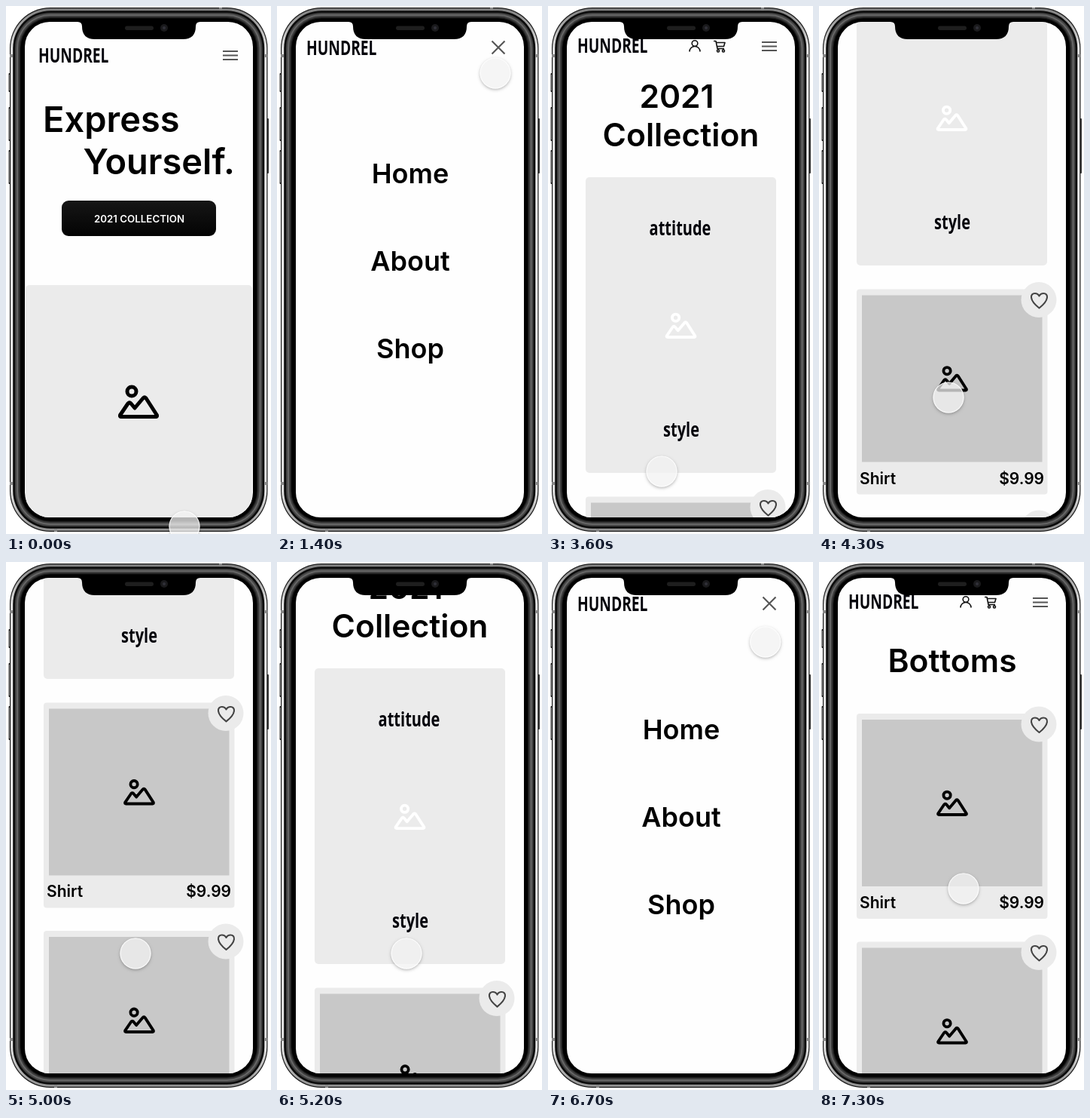
Animation, 352 px wide and 700 px high, one loop 8 s. Source, as an HTML page with a canvas:

```html
<!DOCTYPE html>
<html lang="en">
<head>
<meta charset="utf-8">
<title>Shop prototype</title>
<style>
html, body { margin: 0; width: 100%; height: 100%; overflow: hidden; background: #fff; }
canvas { display: block; }
</style>
</head>
<body>
<canvas id="stage" width="352" height="700"></canvas>
<script>
const ctx = document.getElementById('stage').getContext('2d');
const LOOP = 8000, STEP = 100;
const BRAND = 'HUNDREL';
const LIGHT = '#ebebeb', MID = '#c8c8c8';

// ---------- helpers ----------
function rr(x, y, w, h, r, fill) {
  ctx.beginPath();
  ctx.roundRect(x, y, w, h, r);
  ctx.fillStyle = fill;
  ctx.fill();
}
function disc(x, y, r, fill) {
  ctx.beginPath();
  ctx.arc(x, y, r, 0, 7);
  ctx.fillStyle = fill;
  ctx.fill();
}
function label(s, x, y, size, { align = 'center', weight = 600, fill = '#000', gap = 0 } = {}) {
  ctx.font = `${weight} ${size}px Inter, sans-serif`;
  ctx.letterSpacing = gap + 'px';
  ctx.textAlign = align;
  ctx.fillStyle = fill;
  ctx.fillText(s, x, y);
  ctx.letterSpacing = '0px';
}
// condensed display face
function narrow(s, x, y, size, align = 'center') {
  ctx.save();
  ctx.translate(x, y);
  ctx.scale(0.74, 1);
  ctx.font = `bold ${size}px "Open Sans", sans-serif`;
  ctx.textAlign = align;
  ctx.fillStyle = '#05050c';
  ctx.fillText(s, 0, 0);
  ctx.restore();
}
function line(d, x, y, width, color, scale = 1) {
  ctx.save();
  ctx.translate(x, y);
  ctx.scale(scale, scale);
  ctx.lineWidth = width;
  ctx.strokeStyle = color;
  ctx.lineJoin = 'round';
  ctx.stroke(new Path2D(d));
  ctx.restore();
}

// ---------- icons ----------
const PICTURE = 'M-24.5 17.5L-14 2Q-12 0-10 2L-5 8L6 -5Q8 -7 10 -5L24.5 17.5Q25 19.5 23 19.5H-23Q-25 19.5-24.5 17.5Z' +
  'M-3 -14A6 6 0 1 1-15 -14A6 6 0 1 1-3 -14Z';
const HEART = 'M0 10C-14 -1-12 -9.5-5.8 -9.5C-3 -9.5-1 -8 0 -6C1 -8 3 -9.5 5.8 -9.5C12 -9.5 14 -1 0 10Z';
const BARS = 'M-10 -5.5H10M-10 0H10M-10 5.5H10';
const CROSS = 'M-8.5 -8.5L8.5 8.5M8.5 -8.5L-8.5 8.5';
const USER = 'M3.8 -3.5A3.8 3.8 0 1 1-3.8 -3.5A3.8 3.8 0 1 1 3.8 -3.5ZM-7 7.5A7 7 0 0 1 7 7.5';
const CART = 'M-8 -6.5H-5L-3 3.5H6M-4.5 -4.5H7L5.5 .5H-3.5M-.5 6.5A1.5 1.5 0 1 1-3.5 6.5A1.5 1.5 0 1 1-.5 6.5Z' +
  'M6.5 6.5A1.5 1.5 0 1 1 3.5 6.5A1.5 1.5 0 1 1 6.5 6.5Z';

// ---------- pages ----------
function button(y) {
  const g = ctx.createLinearGradient(0, y, 0, y + 47);
  g.addColorStop(0, '#161616');
  g.addColorStop(1, '#030303');
  rr(74, y, 205, 47, 9, g);
  label('2021 COLLECTION', 177, y + 28.5, 13.3, { fill: '#fff' });
}
function header(y, shop) {
  narrow(BRAND, 39, y + 9, 26, 'left');
  line(BARS, 294, y + 0.5, 2, '#555');
  if (shop) {
    line(USER, 195, y, 1.6, '#111');
    line(CART, 228, y, 1.6, '#111');
  }
}
function product(y) {
  rr(50, y, 253.5, 272, 4, LIGHT);
  rr(57, y + 8, 239.5, 221, 0, MID);
  line(PICTURE, 177, y + 119, 5, '#000', 0.77);
  disc(292, y + 14, 23.5, LIGHT);
  line(HEART, 292.5, y + 15, 2.1, '#444');
  label('Shirt', 54, y + 258, 21, { align: 'left' });
  label('$9.99', 299, y + 258, 21, { align: 'right' });
}

function home() {
  narrow(BRAND, 43, 75, 26, 'left');
  line(BARS, 298, 65.5, 2, '#555');
  label('Express', 49, 166.5, 47, { align: 'left' });
  label('Yourself.', 304, 222.5, 47, { align: 'right' });
  button(258);
  rr(26, 370, 301, 330, 5, LIGHT);
  line(PICTURE, 176, 525, 5, '#000');
}
function menu() {
  narrow(BRAND, 39, 65, 26, 'left');
  line(CROSS, 294, 55, 2.1, '#555');
  ['Home', 'About', 'Shop'].forEach((s, i) => label(s, 177, 235 + i * 116, 36));
}
const STORY = [
  ['Our mission is to', 'create clothes that tell', 'the world exactly who', 'you are without breaking', 'the bank.'],
  ['We were funded in 2019', 'after we struggled with', 'finding good and', 'affordable clothes that', 'also fashionable and', 'expressive.'],
  ['Check out our newest', 'collection to see what', 'everyone is raving about.']
];
function about() {
  header(52);
  label('Clothes That', 172, 140, 42.6);
  label('Speak Up.', 177, 191, 42.6);
  let y = 255;
  for (const part of STORY) {
    part.forEach((s, i) => {
      label(s, 177.5 + (i ? 0 : 10), y, 16, { weight: 400, gap: 2.4 });
      y += 19.75;
    });
    y += 19.75;
  }
  button(594);
}
function collection(scroll) {
  ctx.save();
  ctx.translate(0, -scroll);
  header(53, true);
  label('2021', 171, 134.5, 42.6);
  label('Collection', 176.5, 185.5, 42.6);
  rr(50, 227, 253, 392, 5, LIGHT);
  narrow('attitude', 175.5, 304, 27);
  line(PICTURE, 176.5, 424, 5, '#fff', 0.77);
  narrow('style', 177, 571, 27);
  for (let i = 0; i < 3; i++) product(650.5 + i * 302.5);
  ctx.restore();
}
function bottoms() {
  header(53, true);
  label('Bottoms', 177, 146, 42.6);
  product(201);
  product(503.5);
}

// ---------- phone ----------
function sideKey(x, y, h) {
  rr(x, y, 5, h, 1, '#222');
  rr(x + 1, y + 2, 3, h - 4, 0, '#ddd');
}
function shell() {
  ctx.fillStyle = '#fff';
  ctx.fillRect(0, 0, 352, 700);
  sideKey(3.5, 89, 25);
  sideKey(3.5, 134, 45);
  sideKey(3.5, 191, 45);
  rr(345, 149, 4, 73, 1, '#333');
  const ring = (d, c) => rr(5 + d, 2 + d, 342.5 - 2 * d, 695 - 2 * d, 54 - d, c);
  const side = ctx.createLinearGradient(0, 0, 0, 700);
  [[0, '#777'], [0.08, '#e8e8e8'], [0.5, '#f4f4f4'], [0.92, '#e4e4e4'], [1, '#888']].forEach(s => side.addColorStop(...s));
  ring(0, '#1c1c1c');
  ring(1.2, side);
  ring(4.2, '#0c0c0c');
  ring(7, '#444');
  ring(9, '#666');
  ring(11, '#3c3c3c');
  ring(13, '#181818');
  ring(14.5, '#000');
  ctx.fillStyle = '#888';
  for (const y of [64, 631]) {
    ctx.fillRect(5, y, 4, 4);
    ctx.fillRect(343.5, y, 4, 4);
  }
  ctx.fillRect(283, 2, 4, 4);
  ctx.fillRect(64, 693, 4, 4);
}
function notch() {
  ctx.fillStyle = '#000';
  ctx.fill(new Path2D('M95 20V21Q101 21 101 27Q101 44 118 44H235Q252 44 252 27Q252 21 258 21V20Z'));
  rr(158, 26.5, 38, 5.5, 3, '#1e1e1e');
  disc(210, 29, 5, '#1a1a1c');
  disc(210, 29, 2, '#303038');
}

// ---------- motion ----------
const smooth = k => k * k * (3 - 2 * k);
const speedUp = k => k ** 1.6;
const slowDown = k => 1 - (1 - k) ** 2;
// start, end, x, y, easing
const MOVES = [
  [0, 200, 255, 317, smooth],
  [300, 800, 303, 80, smooth],
  [1300, 1400, 290, 89, smooth],
  [1400, 1700, 184, 340, smooth],
  [2000, 2300, 268, 137, speedUp],
  [2300, 2500, 291, 68, slowDown],
  [2500, 2900, 149, 622, smooth],
  [2900, 3000, 151, 617, smooth],
  [3800, 4000, 172, 519, smooth],
  [5500, 5800, 286, 102, smooth],
  [5800, 6200, 300, 68, slowDown],
  [6600, 7100, 192, 433, smooth]
];
function part(t, a, b) {
  return Math.min(1, Math.max(0, (t - a) / (b - a)));
}
function pointer(t) {
  let x = 237, y = 690;
  for (const [a, b, nx, ny, ease] of MOVES) {
    const k = ease(part(t, a, b));
    x += (nx - x) * k;
    y += (ny - y) * k;
  }
  ctx.save();
  const outside = new Path2D();
  outside.rect(0, 0, 352, 700);
  outside.arc(x, y, 20.5, 0, 7);
  ctx.clip(outside, 'evenodd');
  ctx.shadowColor = 'rgba(0,0,0,.35)';
  ctx.shadowBlur = 4;
  ctx.shadowOffsetY = 1.5;
  disc(x, y, 20, '#fff');
  ctx.restore();
  disc(x, y, 20.5, 'rgba(242,242,242,.75)');
  ctx.lineWidth = 1.2;
  ctx.strokeStyle = 'rgba(255,255,255,.75)';
  ctx.beginPath();
  ctx.arc(x, y, 20, 0, 7);
  ctx.stroke();
}
function page(t) {
  if (t < 1000) home();
  else if (t < 1800) menu();
  else if (t < 3600) about();
  else if (t < 6400) collection(550 * (smooth(part(t, 4100, 4500)) - smooth(part(t, 4900, 5300))));
  else if (t < 7300) menu();
  else bottoms();
}

function draw(t) {
  shell();
  ctx.save();
  ctx.beginPath();
  ctx.roundRect(25, 21, 303, 657, 33);
  ctx.clip();
  ctx.fillStyle = '#fefefe';
  ctx.fillRect(0, 0, 352, 700);
  page(t);
  ctx.restore();
  notch();
  pointer(t);
}
const begin = performance.now();
function tick() {
  const t = (performance.now() - begin) % LOOP;
  draw(Math.floor(t / STEP) * STEP);
  requestAnimationFrame(tick);
}
tick();
</script>
</body>
</html>
```
